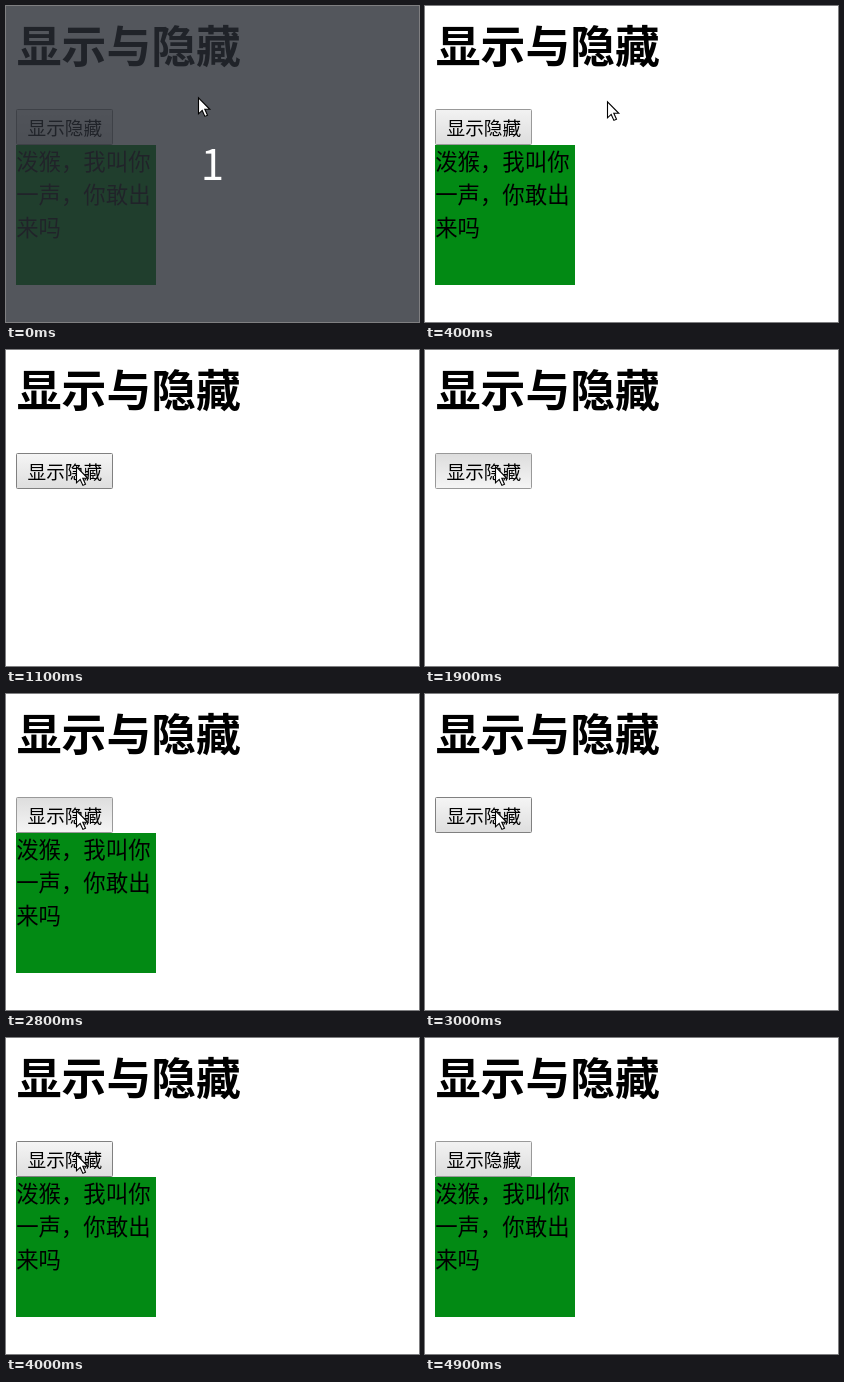
An HTML page for the animation above (5600 ms loop, 413x316 px).

```html
<!DOCTYPE html>
<html lang="zh-CN">
<head>
<meta charset="utf-8">
<title>显示与隐藏</title>
<style>
  html, body { margin: 0; width: 100%; height: 100%; overflow: hidden; background: #fff; }
  svg { display: block; width: 413px; height: 316px; font-family: "Noto Sans CJK SC", "Noto Sans CJK", sans-serif; }
</style>
</head>
<body>
<svg viewBox="0 0 413 316">
  <defs>
    <linearGradient id="normal" x2="0" y2="1"><stop stop-color="#f2f2f2"/><stop offset="1" stop-color="#dddddd"/></linearGradient>
    <linearGradient id="hover" x2="0" y2="1"><stop stop-color="#f5f5f5"/><stop offset="1" stop-color="#dedede"/></linearGradient>
    <linearGradient id="pressed" x2="0" y2="1"><stop stop-color="#dddddd"/><stop offset="1" stop-color="#f5f5f5"/></linearGradient>
  </defs>
  <rect width="413" height="316" fill="#fff"/>
  <text x="10.8" y="56.6" font-size="44.8" font-weight="700">显示与隐藏</text>
  <rect id="button" x="10.5" y="103.5" width="96" height="35" rx="1"/>
  <text x="21.5" y="129" font-size="18.667">显示隐藏</text>
  <g id="panel" font-size="22.4">
    <rect x="10" y="139" width="140" height="140" fill="#028a14"/>
    <text x="10.2" y="164">泼猴，我叫你</text>
    <text x="10.2" y="197">一声，你敢出</text>
    <text x="10.2" y="230">来吗</text>
  </g>
  <g id="countdown">
    <rect width="413" height="316" fill="#282c34" fill-opacity=".8"/>
    <text x="206.5" y="174" font-size="42" fill="#fff" text-anchor="middle">1</text>
  </g>
  <path id="cursor" d="M.5 .8V16.8L4.2 13.4L6.9 19.4L9.5 18.3L6.8 12.3H11.8Z" fill="#fff" stroke="#000" stroke-width="1.1"/>
</svg>
<script>
  const LOOP = 5600;
  const el = id => document.getElementById(id);
  const [button, panel, countdown, cursor] = ['button', 'panel', 'countdown', 'cursor'].map(el);

  // Each track lists [start ms, value].
  const pointer = [
    [0, [192, 91]], [400, [182, 95]], [500, [152, 103]], [600, [112, 111]], [700, [80, 116]], [800, [70, 116]],
    [4600, [71, 112]], [4700, [75, 76]], [4800, [80, 6]], [4900, null]
  ];
  const buttonState = [
    [0, 'normal'], [700, 'hover'], [1900, 'pressed'], [2000, 'hover'], [2800, 'pressed'],
    [3000, 'hover'], [3900, 'pressed'], [4000, 'hover'], [4700, 'normal']
  ];
  const panelShown = [[0, true], [1100, false], [2000, true], [3000, false], [4000, true]];
  const border = { normal: '#999', hover: '#808080', pressed: '#999' };

  const at = (track, t) => track.findLast(([start]) => start <= t)[1];
  const show = (node, on) => node.setAttribute('visibility', on ? 'visible' : 'hidden');

  function draw(now) {
    const t = now % LOOP;
    const state = at(buttonState, t);
    const pos = at(pointer, t);
    button.setAttribute('fill', `url(#${state})`);
    button.setAttribute('stroke', border[state]);
    show(panel, at(panelShown, t));
    show(countdown, t < 400);
    show(cursor, pos);
    if (pos) cursor.setAttribute('transform', `translate(${pos})`);
  }

  const begin = performance.now();
  function tick() {
    draw(performance.now() - begin);
    requestAnimationFrame(tick);
  }
  tick();
</script>
</body>
</html>
```
